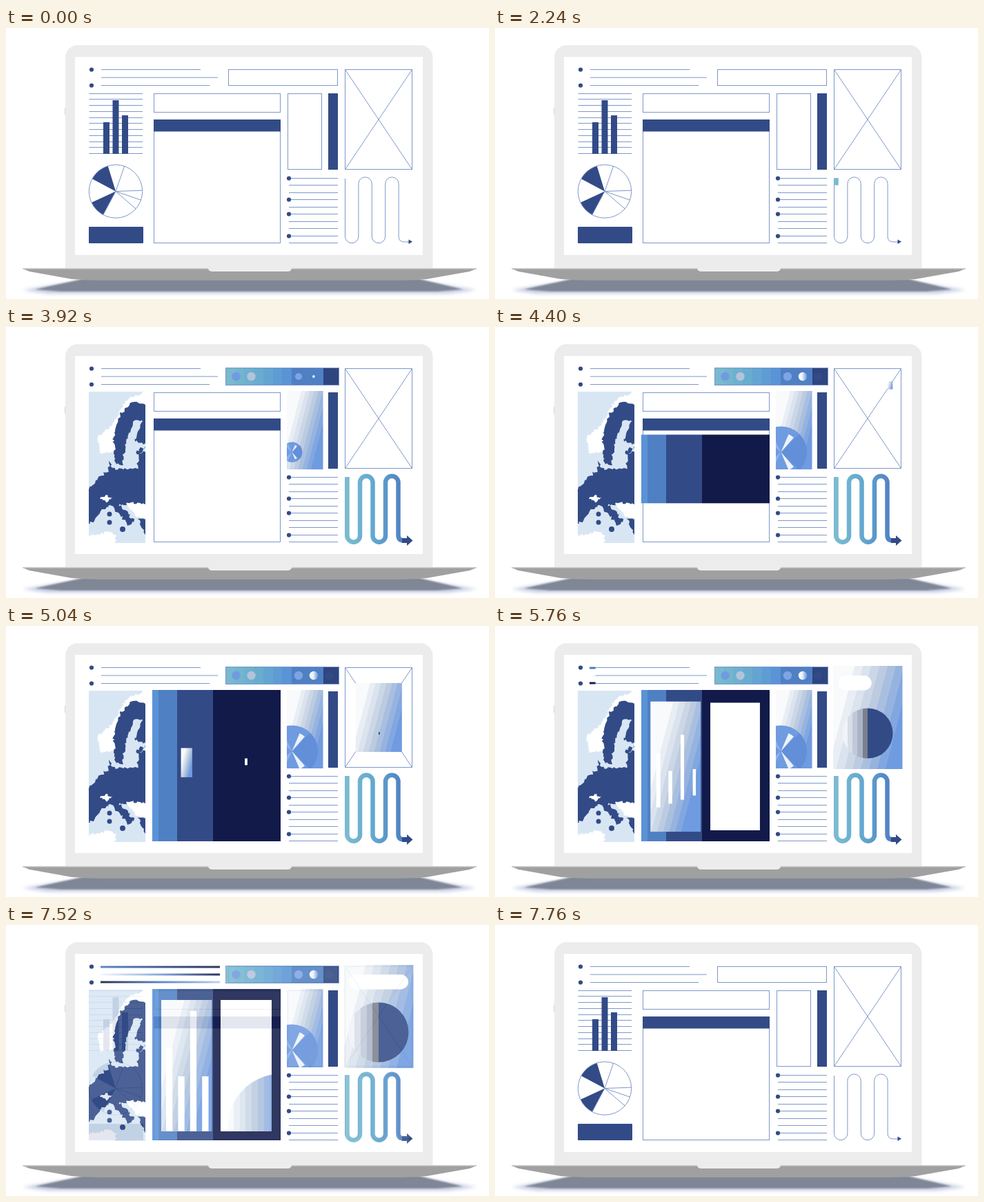
Animation of 700 by 394 pixels, one loop 8000 ms. Source, as an HTML page with a canvas:

```html
<!DOCTYPE html>
<html lang="en">
<head>
<meta charset="utf-8">
<title>Wireframe to design</title>
<style>
html, body { margin: 0; width: 100%; height: 100%; overflow: hidden; background: #fff; }
canvas { display: block; }
</style>
</head>
<body>
<canvas id="stage" width="700" height="394"></canvas>
<script>
const screen2d = document.getElementById('stage').getContext('2d');
let ctx = screen2d;
const LOOP = 8000, STEP = 80, START = 2240, FADE = 7440, END = 7760;
const NAVY = '#324b87', INK = '#121a49', BLUE = '#4f80c3', SKY = '#6f9be0', THIN = '#7d97c9', SEA = '#d8e6f4';
const PALE = ramp(9, '#f8fafc', '#bccbe0', SKY);
const SHADE = [...ramp(4, '#f0f3f8', '#a9b4c8'), '#7b808c', ...Array(5).fill(NAVY)];

const mix = (a, b, u) => a + (b - a) * u;
const rad = deg => deg * Math.PI / 180;

// Eased progress (quadratic in-out) between two times
function ease(t, from, to) {
  const u = Math.min(1, Math.max(0, (t - from) / (to - from)));
  return u < .5 ? 2 * u * u : 1 - 2 * (1 - u) ** 2;
}

// n colours evenly spaced along the given stops
function ramp(n, ...stops) {
  const rgb = stops.map(hex => [1, 3, 5].map(i => parseInt(hex.slice(i, i + 2), 16)));
  return Array.from({ length: n }, (_, i) => {
    const u = i / (n - 1) * (rgb.length - 1), k = Math.min(Math.floor(u), rgb.length - 2);
    return `rgb(${rgb[k].map((c, j) => c + (rgb[k + 1][j] - c) * (u - k))})`;
  });
}
function smooth(x0, x1, colors) {
  const g = ctx.createLinearGradient(x0, 0, x1, 0);
  colors.forEach((c, i) => g.addColorStop(i / (colors.length - 1), c));
  return g;
}
function bands(x0, y0, x1, y1, colors) {
  const g = ctx.createLinearGradient(x0, y0, x1, y1), n = colors.length;
  colors.forEach((c, i) => { g.addColorStop(i / n, c); g.addColorStop((i + 1) / n, c); });
  return g;
}

function box(x0, y0, x1, y1, fill) {
  ctx.fillStyle = fill;
  ctx.fillRect(x0, y0, x1 - x0, y1 - y0);
}
const whiteBox = (x0, y0, x1, y1) => box(x0, y0, x1, y1, '#fff');
function paleBox(x0, y0, x1, y1) {
  const w = x1 - x0, mid = (y0 + y1) / 2;
  box(x0, y0, x1, y1, bands(x0, mid, x1, mid + w * .26, PALE));
}
function frame(x0, y0, x1, y1) {
  ctx.strokeRect(x0, y0, x1 - x0, y1 - y0);
}
function line(...pts) {
  ctx.beginPath();
  for (let i = 0; i < pts.length; i += 2) ctx.lineTo(pts[i], pts[i + 1]);
  ctx.stroke();
}
function poly(fill, pts) {
  ctx.beginPath();
  for (let i = 0; i < pts.length; i += 2) ctx.lineTo(pts[i], pts[i + 1]);
  ctx.fillStyle = fill;
  ctx.fill();
}
function sector(x, y, r, a0, a1, fill) {
  ctx.beginPath();
  ctx.moveTo(x, y);
  ctx.arc(x, y, r, rad(a0), rad(a1));
  ctx.fillStyle = fill;
  ctx.fill();
}
const disc = (x, y, r, fill) => sector(x, y, r, 0, 360, fill);
function pill(x, y, w, h, r, fill) {
  ctx.beginPath();
  ctx.roundRect(x, y, w, h, r);
  ctx.fillStyle = fill;
  ctx.fill();
}
function clipped(x0, y0, x1, y1, draw) {
  ctx.save();
  ctx.beginPath();
  ctx.rect(x0, y0, x1 - x0, y1 - y0);
  ctx.clip();
  draw();
  ctx.restore();
}
// Box scaled by s, its centre moving in from (fromX, fromY) by m
function grow(x0, y0, x1, y1, s, draw, fromX, fromY, m = s) {
  if (s <= 0) return;
  const cx = mix(fromX, (x0 + x1) / 2, m), cy = mix(fromY, (y0 + y1) / 2, m);
  const w = (x1 - x0) / 2 * s, h = (y1 - y0) / 2 * s;
  draw(cx - w, cy - h, cx + w, cy + h);
}

function laptop() {
  ctx.save();
  ctx.filter = 'blur(2.5px)';
  poly('#c3cbe2', [24, 381, 80, 372, 625, 372, 682, 381, 640, 386, 60, 386]);
  ctx.filter = 'blur(1px)';
  poly('#7f8696', [42, 380, 110, 365, 600, 365, 662, 380, 625, 383, 80, 383]);
  ctx.restore();
  box(85, 116, 87, 126, '#d8d8d8');
  pill(86, 25, 532.5, 325, [18, 18, 0, 0], '#ececec');
  poly('#a0a0a0', [24, 350, 682, 350, 672, 354, 610, 365, 570, 367, 135, 367, 95, 365, 34, 354]);
  box(24, 349, 682, 350.5, '#d0d0d0');
  pill(293, 349, 121, 5, [0, 0, 5, 5], '#ededed');
}

// Winding line: four U-turns, then a bend towards the arrow
function snake(x, step, top, bottom, start, endX, endY) {
  const r = step / 2, last = x + step * 4;
  ctx.beginPath();
  ctx.moveTo(x, start);
  for (let i = 0; i < 4; i++) {
    const down = i % 2 === 0;
    ctx.arc(x + step * i + r, down ? bottom : top, r, Math.PI, 0, down);
  }
  ctx.lineTo(last, endY - 8);
  ctx.quadraticCurveTo(last, endY, last + 8, endY);
  ctx.lineTo(endX, endY);
  ctx.stroke();
}

function wireframe() {
  whiteBox(100, 42, 604, 330);
  ctx.strokeStyle = THIN;
  [282, 307, 295].forEach((end, i) => line(138, 60.5 + 11.5 * i, end, 60.5 + 11.5 * i));
  [60.5, 83.5].forEach(y => disc(124, y, 3.1, NAVY));
  frame(322.5, 60.5, 480.5, 83.5);
  frame(214.5, 95.5, 397.5, 122.5);
  frame(214.5, 133.5, 397.5, 312.5);
  box(214, 133, 398, 150.5, NAVY);
  frame(408.5, 95.5, 457.5, 205.5);
  box(467, 95, 481, 206, NAVY);
  frame(491.5, 60.5, 588.5, 205.5);
  line(491.5, 60.5, 588.5, 205.5);
  line(588.5, 60.5, 491.5, 205.5);

  // Bar chart and pie
  for (let i = 0; i < 11; i++) {
    const y = Math.floor(95 + i * 8.75) + .5;
    line(120.5, y, 198, y);
  }
  [137, 105, 127].forEach((y, i) => box(141 + 13.5 * i, y, 150 + 13.5 * i, 183, NAVY));
  const cx = 159, cy = 237.5, r = 38.7;
  sector(cx, cy, r, 208, 253, NAVY);
  sector(cx, cy, r, 118, 155, NAVY);
  ctx.beginPath();
  ctx.arc(cx, cy, r, 0, 7);
  ctx.stroke();
  [-71, -2, 19, 41, 118].forEach(a => line(cx, cy, cx + r * Math.cos(rad(a)), cy + r * Math.sin(rad(a))));
  pill(120, 289, 79, 24, 1, NAVY);

  // List and winding line
  for (let i = 0; i < 10; i++) {
    const y = Math.floor(218 + i * 10.5) + .5;
    line(410, y, 481, y);
    if ([0, 3, 5, 8].includes(i)) disc(410, y, 3.1, NAVY);
  }
  snake(491.5, 19.4, 226.5, 303, 219, 584, 311);
  poly(NAVY, [583.5, 307.5, 589, 310.8, 583.5, 314]);
}

// Coastline: a few corners, roughened in between with seeded offsets
function coast(fill, pts) {
  let seed = pts[0];
  const wobble = () => (seed = (seed * 137 + 71) % 1009, seed / 1009 - .5) * 4;
  const out = [];
  for (let i = 0; i < pts.length; i += 2) {
    const x = pts[i], y = pts[i + 1];
    const nx = pts[(i + 2) % pts.length], ny = pts[(i + 3) % pts.length];
    const n = Math.ceil(Math.hypot(nx - x, ny - y) / 3);
    for (let k = 0; k < n; k++) out.push(mix(x, nx, k / n) + wobble(), mix(y, ny, k / n) + wobble());
  }
  poly(fill, out);
}
function map() {
  box(120, 94, 202, 314, SEA);
  coast('#fff', [206, 92, 174, 106, 157, 138, 133, 162, 137, 186, 158, 180, 180, 118, 206, 114]);
  coast(NAVY, [159, 200, 156, 160, 166, 126, 184, 109, 206, 112, 206, 172, 172, 200]);
  coast(SEA, [188, 134, 197, 138, 186, 164, 206, 172, 189, 180, 190, 202, 168, 206, 173, 166]);
  coast(NAVY, [116, 242, 132, 221, 147, 209, 150, 196, 156, 207, 191, 205, 191, 184, 206, 178, 206, 262,
    163, 257, 186, 281, 178, 287, 152, 260, 138, 266, 128, 284, 116, 286]);
  coast('#fff', [136, 250, 146, 245, 155, 249, 146, 254]);
  coast('#fff', [174, 256, 206, 257, 206, 281, 189, 275]);
  coast(NAVY, [192, 280, 206, 278, 202, 303]);
  coast('#fff', [116, 304, 152, 297, 159, 302, 158, 318, 116, 318]);
  [272, 284].forEach(y => disc(150, y, 3.5, NAVY));
  disc(169, 294, 4, NAVY);
}

function topBar(t) {
  clipped(mix(483, 318, ease(t, 2380, 3400)), 59, 483, 85, () => {
    box(318, 59, 414, 85, bands(318, 0, 414, 0, ramp(7, '#78b9cf', '#68acd0', '#5a94d6')));
    box(414, 59, 460, 85, BLUE);
    box(460, 59, 483, 85, '#2e457f');
    ctx.strokeStyle = THIN;
    frame(318.5, 59.5, 482.5, 84.5);
  });
  const half = smooth(439, 451, ['#fff', '#f0f3f8', '#7da5e3']);
  [SKY, '#b5c3d9', '#7da5e3', half, NAVY].forEach((fill, i) => {
    const x = 333.5 + 22 * i + (i > 1 ? 46.5 : 0);
    disc(x, 72, 6.2 * ease(t, 3400 + i * 120, 3800 + i * 120), fill);
  });
}

function windingArrow(t) {
  const drawn = ease(t, 2160, 2960);
  ctx.save();
  ctx.strokeStyle = smooth(491, 575, ['#7cbdd0', '#62a8cf', BLUE]);
  ctx.lineWidth = 6.5;
  ctx.setLineDash([530 * drawn, 999]);
  snake(494.5, 18.5, 226, 303.5, 218, 578, 310.5);
  ctx.restore();
  if (drawn > .95) poly(NAVY, [574, 307, 581, 307, 581, 303, 589.5, 310.5, 581, 318, 581, 314, 574, 314]);
}

function narrowCard(t) {
  grow(407, 93, 459.5, 207, ease(t, 3120, 3920), paleBox, 433, 150);
  clipped(407, 93, 459.5, 207, () => {
    const r = 37.5 * ease(t, 3600, 4320), x = 414.5, y = 182;
    disc(x, y, r, SKY);
    sector(x, y, r, -45, 45, '#628fd8');
    [-1, 1].forEach(side => {
      const a = 58 * side;
      sector(x, y, r * .75, a - 9, a + 9, '#eef3fa');
      sector(x, y, r, a * 2.2 - 12, a * 2.2 + 12, '#8fb2ea');
    });
  });
}

function mainPanel(t) {
  const open = ease(t, 4000, 4840), mid = mix(209, 203, open);
  clipped(212, mid - 110 * open, 398, mid + 110 * open, () => {
    box(212, 90, 221, 318, '#5a92d6');
    box(221, 90, 248, 318, BLUE);
    box(248, 90, 300, 318, NAVY);
    box(300, 90, 398, 318, INK);
  });
  // Panels and bars all unfold from the same height
  const unfold = (x0, y0, x1, s, draw) => grow(x0, y0, x1, 300, s, draw, (x0 + x1) / 2, 197);
  unfold(225, 109, 298.5, ease(t, 4640, 5840), paleBox);
  unfold(311, 109, 385, ease(t, 4880, 5880), whiteBox);
  [178, 220, 125, 220].forEach((top, i) => {
    const x = 232 + 17.4 * i, from = 5180 + 30 * i;
    unfold(x, top, x + 9.3, ease(t, from, from + 1000), whiteBox);
  });
  clipped(311, 109, 385, 300, () => {
    const r = 79 * ease(t, 5760, 6520);
    disc(400, 295, r, bands(400 - r, 0, 400, 0, PALE));
  });
}

function pictureCard(t) {
  clipped(100, 42, 604, 330, () =>
    grow(490, 58, 590.5, 208, ease(t, 4080, 5700), paleBox, 601, 42, ease(t, 4080, 4740)));
  const r = 43.5 * ease(t, 4840, 6120), label = 86 * ease(t, 5300, 6160);
  disc(540, 156, r, bands(540 - r, 0, 540 + r, 0, SHADE));
  pill(497, 72, label, 21.5, Math.min(10.7, label / 2), '#fff');
}

function textLines(t) {
  const length = 173 * ease(t, 5520, 7040);
  [[BLUE, NAVY, INK], ['#fff', '#7da5e3', INK], [INK, BLUE, '#b5cdee']].forEach((colors, i) =>
    box(137, 59.5 + 11 * i, 137 + length, 62.5 + 11 * i, smooth(137, 310, colors)));
}

// The wireframe never changes, so it is drawn once
const plan = document.createElement('canvas');
plan.width = 700;
plan.height = 394;
ctx = plan.getContext('2d');
wireframe();
ctx = screen2d;

function render(now) {
  const t = Math.floor(now % LOOP / STEP) * STEP;
  ctx.clearRect(0, 0, 700, 394);
  laptop();
  ctx.drawImage(plan, 0, 0);
  if (t < START || t >= END) return;
  clipped(120, 94, 202, 94 + 220 * ease(t, 2240, 3300), map);
  [windingArrow, topBar, narrowCard, mainPanel, pictureCard, textLines].forEach(part => part(t));
  ctx.globalAlpha = ease(t, FADE, END);
  ctx.drawImage(plan, 0, 0);
  ctx.globalAlpha = 1;
}

const began = performance.now();
function tick() {
  render(performance.now() - began);
  requestAnimationFrame(tick);
}
tick();
</script>
</body>
</html>
```
